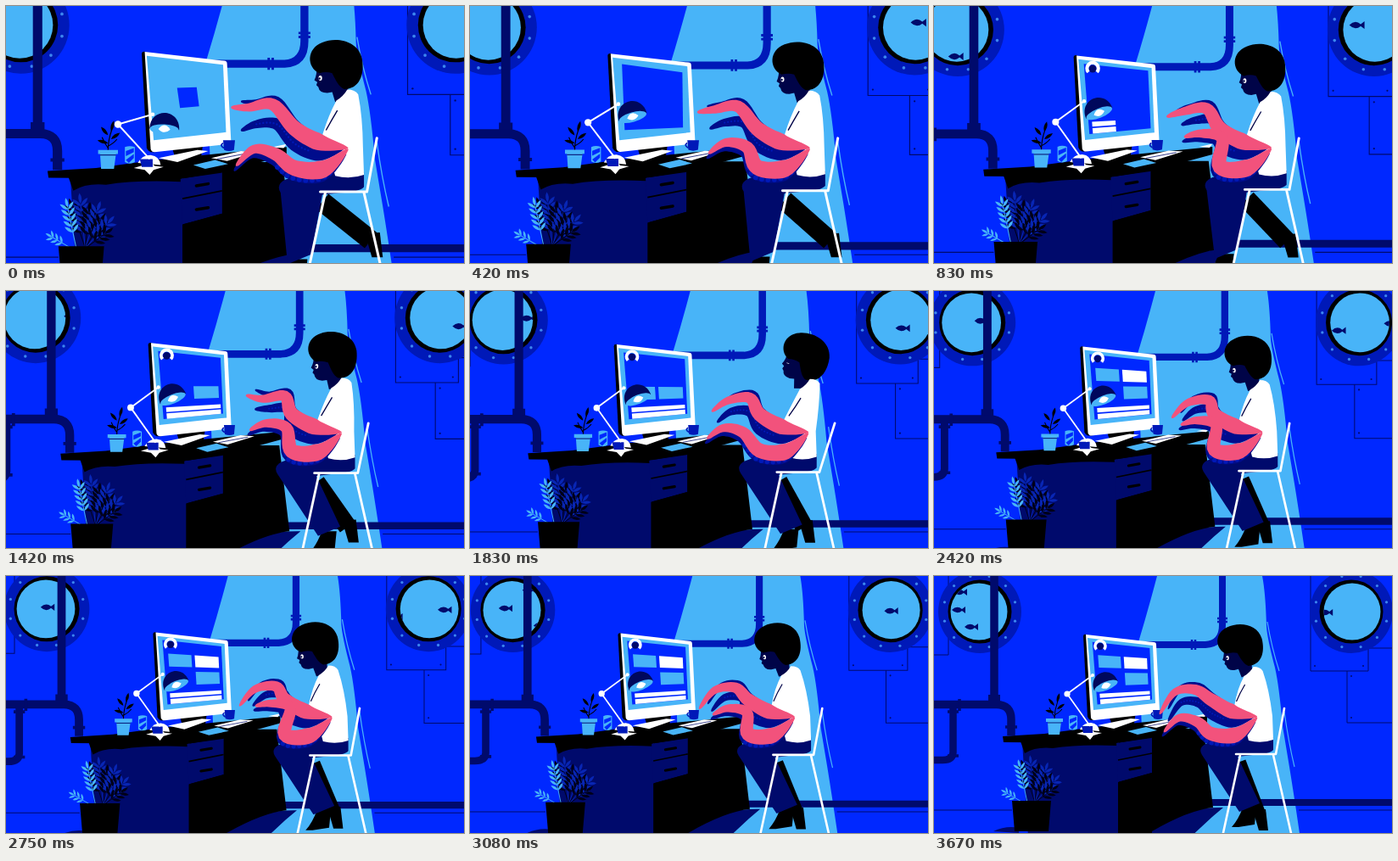
Recreate the animation shown at these times as an HTML page. Size 540x303 px, loop 3.75 s.

```html
<!DOCTYPE html>
<html lang="en">
<head>
<meta charset="utf-8">
<title>Desk under the sea</title>
<style>
html, body { margin: 0; width: 100%; height: 100%; overflow: hidden; background: #0028ff; }
svg { display: block; width: 100vw; height: 100vh; }
</style>
</head>
<body>
<svg id="stage" viewBox="0 0 540 303" preserveAspectRatio="xMidYMid slice"></svg>
<script>
const BLUE = '#0028ff', LIGHT = '#48b4f8', NAVY = '#000a6c', DEEP = '#000c8c', RING = '#0019b8',
      BLACK = '#000', PINK = '#f2527c', SKIN = '#000448', WHITE = '#fff';
const LOOP = 3750, STEP = 250 / 3, LAST = 44;
const stage = document.getElementById('stage');

const path = (d, fill, more = '') => `<path d="${d}" fill="${fill}" ${more}/>`;
const line = (d, color, w, more = '') =>
  `<path d="${d}" fill="none" stroke="${color}" stroke-width="${w}" ${more}/>`;
const disc = (x, y, r, fill) => `<circle cx="${x}" cy="${y}" r="${r}" fill="${fill}"/>`;
const ROUND = 'stroke-linecap="round" stroke-linejoin="round"';

const lerp = (a, b, f) => a + (b - a) * f;
const ramp = (i, a, b) => {
  const f = Math.min(1, Math.max(0, (i - a) / (b - a)));
  return f * f * (3 - 2 * f);
};
const bump = (i, mid, width) => Math.exp(-(((i - mid) / width) ** 2));
const wave = (i, period) => Math.cos(2 * Math.PI * i / period);

// ---- still parts ----

function leaf(x, y, deg, len, fill) {
  const w = len * .3;
  return path(`M0 0Q${len / 2} ${-w} ${len} 0Q${len / 2} ${w} 0 0`, fill,
    `transform="translate(${x} ${y}) rotate(${deg})"`);
}

function sprig(x0, y0, deg, len, size, fill) {
  const a = deg * Math.PI / 180, n = Math.round(len / 8);
  const at = f => [x0 + Math.cos(a) * len * f, y0 + Math.sin(a) * len * f];
  let s = line(`M${x0} ${y0}L${at(1)}`, fill, .9) + leaf(...at(1), deg, size, fill);
  for (let k = 1; k <= n; k++)
    for (const side of [-45, 45]) s += leaf(...at(.25 + .7 * k / n), deg + side, size, fill);
  return s;
}

function darkFan() {
  let s = '';
  for (let k = 0; k < 7; k++)
    s += sprig(119, 267, -108 + 12 * k, 42 - 3 * k + 6 * (k % 2), 11, k % 2 ? '#0826b4' : '#000018');
  return s;
}

function porthole(x, y, shift, id) {
  let s = disc(x, y, 49, RING);
  for (let k = 0; k < 12; k++) {
    const a = (k + .5) * Math.PI / 6;
    s += disc(x + 43 * Math.cos(a), y + 43 * Math.sin(a), 1.6, '#3c86f0');
  }
  const glass = fill => disc(x + shift, y, 33.5, fill);
  return s + disc(x, y, 37.5, BLACK) + glass(LIGHT) +
    `<clipPath id="clip-${id}">${glass(WHITE)}</clipPath><g id="${id}" clip-path="url(#clip-${id})"></g>`;
}

const room =
  path('M263 0Q252 42 241 78L250 310H432Q425 262 419 225L411 177Q407 130 402 108Q393 74 392 60Q391 20 387 0Z', LIGHT) +
  line('M393 54Q398 84 407 112M413 160Q418 196 425 225', LIGHT, 1.2) +
  line('M340 0V58Q340 80 320 81H244', RING, 8) +
  line('M334 50H346M334 54H346M304 75V87M308 75V87', RING, 2.5) +
  line('M0 276H92M430 276H540M17 0V93H-30M444 0V112H512V85H600M487 112V173H600', NAVY, 1) +
  [[449, 106], [506, 106], [492, 118], [492, 167]].map(p => disc(...p, 1, NAVY)).join('') +
  porthole(54, 42, -1, 'seaL') + porthole(492, 42, 1, 'seaR') +
  line('M71 -30V146', NAVY, 9.5) + line('M64 142H78M64 146H78', NAVY, 4) +
  line('M-40 151.5H74Q91 152 91 169V188', NAVY, 9.5) +
  line('M22.5 153V208Q22 217 10 217H-40', NAVY, 8.5) +
  line('M30 145V159M16 160H29M16 212H29M84 178H98', NAVY, 3.5) +
  line('M322 267H600', NAVY, 8) +
  path('M216 310L240 294Q300 272 341 273L328 284L300 310Z', NAVY) +
  path('M70 301Q85 294 100 297V303Z', NAVY);

const desk =
  path('M250 180H318L329 273Q300 276 257 301V340H212V196Z', BLACK) +
  path('M104 195H218V340H113Z', NAVY) +
  path('M102 195H216V200Q170 198 140 203Q120 201 107 209Z', BLACK) +
  path('M215 197L257 190V232L217 243Z', NAVY) + path('M217 243L257 232V340H217Z', BLACK) +
  line('M217 217L257 209', BLACK, 1.6) + line('M231 204L243 202M231 228L243 226', BLACK, 3, ROUND) +
  path('M81 189L130 186L190 178L260 171L322 165V173L256 191L214 197L82 196Z', BLACK);

const monitor =
  path('M205 160H238L236 174L210 177Z', BLACK) +
  path('M193 176L232 168L243 169L212 180Z', WHITE) +
  path('M176 71Q176 68 180 69L190 170H185Q182 169 181 166Z', BLACK) +
  path('M179 69L259 78Q262 78 262 81L266 159Q266 162 263 162L189 170Q186 170 185 167Z', WHITE) +
  path('M181 73L258 82L261 150L188 158Z', LIGHT) + '<g id="screen"></g>';

const clutter =
  path('M228 183L250 178L263 182L240 187Z', LIGHT) +
  path('M246 176L276 169L291 170L262 179Z', WHITE) + line('M252 177L284 171', NAVY, .7) +
  path('M308 165L322 162L319 166Z', WHITE) +
  path('M258 158H270L269 168Q264 170 259 168Z', RING) + line('M258 161Q254 163 259 166', RING, 1.5) +
  line('M142 169Q142 158 146 147M142 166Q138 160 136 155M142 164Q148 161 151 157', BLACK, 1) +
  [-75, -130, -35, -165].map((deg, k) => leaf(145 - 3 * (k % 2), 149 + 4 * k, deg, 11, BLACK)).join('') +
  path('M132 168H152V172H150L148 187H135L134 172H132Z', LIGHT) + line('M134 173H150', NAVY, .9) +
  path('M159 165Q164 163 169 165V180Q164 183 159 180Z', LIGHT) +
  path('M160 169L168 166V170L160 174ZM160 178L168 172V176L163 181Z', BLUE) +
  path('M168 186L178 183L183 178L189 184L198 185L188 188L184 193L179 188Z', WHITE) +
  path('M172 181Q176 173 185 173Q194 174 195 183Z', WHITE) + path('M174 177H187V185H176Z', RING);

const plant = darkFan() + sprig(110, 267, -102, 42, 10, LIGHT) + sprig(105, 267, -150, 22, 8, LIGHT) +
  path('M92 265H138L135 301H95Z', BLACK);

const head =
  path('M-20 2Q-19 10-22 16L-19 18L-20 21L-18 23Q-17 29-9 29L-4 28L-1 38L12 34L12 8Z', SKIN) +
  path('M-17 9C-30 3-30-16-14-22C0-28 22-24 26-6C29 11 23 25 8 25C3 23 0 17-4 9Q-10 7-17 9Z', BLACK) +
  '<g id="eye"><ellipse cx="-16" cy="14" rx="1.8" ry="2.6" fill="#fff"/>' + disc(-16.8, 14.4, 1.1, SKIN) + '</g>';

stage.innerHTML = `<rect width="540" height="303" fill="${BLUE}"/><g id="cam">` + room + desk + monitor + clutter +
  '<g id="lamp"></g>' + plant + '<g id="legs"></g><g id="head">' + head +
  '</g><g id="shirt"></g><g id="chair"></g><g id="arms"></g></g>';
const el = {};
stage.querySelectorAll('g[id]').forEach(g => el[g.id] = g);

// ---- tentacles ----

const trace = pts => 'M' + pts.map(p => p.map(v => v.toFixed(1)).join(' ')).join('L');
const move = (pts, dx, dy) => pts.map(([x, y]) => [x + dx, y + dy]);

// Smooth curve through the points, eight samples per span
function curve(p) {
  const out = [], N = 8, at = k => p[Math.max(0, Math.min(p.length - 1, k))];
  for (let s = 0; s <= (p.length - 1) * N; s++) {
    const k = Math.min(p.length - 2, Math.floor(s / N)), t = s / N - k;
    const [a, b, c, d] = [at(k - 1), at(k), at(k + 1), at(k + 2)];
    out.push([0, 1].map(m => .5 * (2 * b[m] + (c[m] - a[m]) * t +
      (2 * a[m] - 5 * b[m] + 4 * c[m] - d[m]) * t * t + (3 * b[m] - a[m] - 3 * c[m] + d[m]) * t ** 3)));
  }
  return out;
}

// Thin at the tip, wide near the elbow, pointed at the shoulder
function tentacle(pts, size, fill) {
  const c = curve(pts), n = c.length - 1, left = [], right = [];
  c.forEach(([x, y], k) => {
    const a = c[Math.max(0, k - 1)], b = c[Math.min(n, k + 1)], t = k / n;
    const len = Math.hypot(b[0] - a[0], b[1] - a[1]) || 1;
    const w = (.6 + size * t ** .6) * Math.min(1, .05 + (1 - t) * 4.5);
    const nx = -(b[1] - a[1]) / len * w, ny = (b[0] - a[0]) / len * w;
    left.push([x + nx, y + ny]);
    right.unshift([x - nx, y - ny]);
  });
  return path(trace(left.concat(right)) + 'Z', fill);
}

function drawArms(i, lean, rest) {
  const u = i / LAST, root = 384 + 7 * lean - 3 * rest;
  const ux = 266 + 18 * Math.sin(Math.PI * u) ** 2, uy = 125 + 38 * u - 14 * bump(i, 17, 3), crest = 122 + 12 * u;
  const beat = .7 * wave(i, 22) + .3 * wave(i, 44);
  const lx = 284 - 13 * beat, ly = 166 + 18 * beat, ridge = .55 * ly + 66;
  const a = [[ux, uy], [ux + 18, crest + 3], [ux + 42, crest], [root - 54, 146], [root - 29, 160], [root, 166]];
  const b = [[lx, ly], [lx + 18, ridge], [lx + 40, ridge + 5], [root - 54, 186], [root - 25, 187], [root, 167]];
  const mid = a.map((p, k) => [lerp(p[0], b[k][0], .4) + 8 - 2.4 * k, lerp(p[1], b[k][1], .4)]);
  const behind = a.map(([x, y], k) => [x + 10 - 3 * k, y - 6 + k]);
  const dots = (pts, from, to, w) =>
    line(trace(curve(pts).slice(from, to)), RING, w, ROUND + ` stroke-dasharray="0 ${w + 1.5}"`);
  el.arms.innerHTML = tentacle(behind, 6, DEEP) + tentacle(mid, 9, DEEP) + dots(mid, 8, 30, 2) +
    tentacle(move(b, -2, 5), 9, DEEP) + dots(move(b, -3, 10), 18, 36, 5) +
    tentacle(a, 9.5, PINK) + tentacle(b, 10, PINK);
}

// ---- screen ----

const corner = [[181, 73], [258, 82], [188, 158], [261, 150]];
const onScreen = (u, v) => [0, 1].map(m =>
  lerp(lerp(corner[0][m], corner[1][m], u), lerp(corner[2][m], corner[3][m], u), v));
const pane = (u0, v0, u1, v1, fill) =>
  path(trace([onScreen(u0, v0), onScreen(u1, v0), onScreen(u1, v1), onScreen(u0, v1)]) + 'Z', fill);

function drawScreen(i) {
  const g = ramp(i, 1, 6), half = lerp(.13, .44, g), face = ramp(i, 5, 8);
  const bar = lerp(.12, .92, ramp(i, 6, 15)), rise = ramp(i, 23, 28), y = lerp(.5, .23, rise);
  const c1 = ramp(i, 16, 21), c2 = ramp(i, 13, 17), c3 = ramp(i, 24, 29);
  let s = `<g transform="rotate(${(i * 5 - 4) * (1 - g)} 220 113)">` +
    pane(.51 - half, .49 - half, .51 + half, .49 + half, BLUE) + '</g>';
  if (face) s += `<g transform="translate(196 82) scale(${face})">` + disc(0, 1, 4, NAVY) +
    line('M-4.5 4.5A6 6 0 1 1 4.5 4.5', WHITE, 3.6) + '</g>';
  if (bar > .13) s += pane(.12, .78, bar, .84, WHITE) + pane(.12, .86, bar, .93, WHITE);
  if (c1) s += pane(.14, y, .14 + .35 * c1, y + .18, LIGHT);
  if (c2) s += pane(.54, y, .54 + .36 * c2, y + .18, rise > .4 ? WHITE : LIGHT);
  if (c3) s += pane(.54, .67 - .19 * c3, .9, .67, LIGHT);
  el.screen.innerHTML = s;
}

// ---- other moving parts ----

function drawLamp(i) {
  const f = ramp(i, 1, 7), joint = [lerp(152, 157, f), lerp(142, 139, f)], end = [187, lerp(132, 117, f)];
  el.lamp.innerHTML = line(trace([[184, 177], joint, end]), WHITE, 1.7) + disc(...joint, 3.6, WHITE) +
    `<g transform="translate(${lerp(199, 201, f)} ${lerp(142, 125, f)}) rotate(${lerp(3, -22, f)})">` +
    path('M-15 5C-15-17 15-17 15 5Z', '#00085c') +
    `<ellipse cy="5" rx="14.5" ry="5" fill="${LIGHT}"/>` + path('M-6 5Q0-3 6 5Q0 11-6 5', WHITE) + '</g>' +
    disc(...end, 2, WHITE);
}

function drawPerson(i, lean, rest) {
  const hx = 372 - 11 * rest + 16 * lean, d = (hx - 360) * .6;
  const step = ramp(i, 9, 17), fx = lerp(334, 371, step), fy = lerp(292, 287, step);
  const bx = lerp(411, 386, ramp(i, 0, 30)), by = lerp(268, 292, i / LAST);
  el.legs.innerHTML =
    line(`M358 220L${bx - 4} ${by - 9}`, BLACK, 20) +
    path(`M${bx - 10} ${by - 16}L${bx + 5} ${by - 17}L${bx + 8} ${by + 8}H${bx - 3}Z`, BLACK) +
    path(`M${fx - 7} ${fy - 14}H${fx + 9}L${fx + 7} ${fy + 6}L${fx - 12} ${fy + 9}H${fx - 20}Q${fx - 12} ${fy} ${fx - 7} ${fy - 14}`, BLACK) +
    path(`M400 190V205Q396 210 376 211L358 213L${fx + 13} ${fy - 19}L${fx - 11} ${fy - 9}L316 211Q311 203 320 198L352 186Z`, NAVY);
  const tilt = 18 * lean - 4 * rest, shut = ramp(lean, .5, .9);
  el.head.setAttribute('transform', `translate(${hx} 81.5) rotate(${tilt})`);
  el.eye.setAttribute('transform', `translate(0 ${12 * shut}) scale(1 ${1 - .88 * shut})`);
  el.shirt.innerHTML =
    path(`M${365 + d} 118Q${372 + d} 114 ${376 + d} 107Q${384 + d} 107 ${387 + d} 112Q${395 + d * .5} 134 399 165L400 193Q386 198 371 194L363 164L${354 + d * .6} 152Q${357 + d} 133 ${365 + d} 118Z`, WHITE) +
    line(`M${366 + d} 128Q${360 + d} 138 ${356 + d * .8} 148`, SKIN, 1.2);
  el.chair.innerHTML = line(`M356 210H403L${413 + 7 * lean} 156M361 211L339 312M400 211L423 312`, WHITE, 2.6, ROUND);
}

// Each swimmer heads left: step, place at that step, speed
const shoalL = [[10, 52, 70, 5], [44, 29, 40, 2.36], [44, 44, 60, 6], [44, 31, 19, 6]];
const shoalR = [[10, 474, 37, 4.4], [22, 495, 51, 3.7], [37, 493, 43, 4.4]];
const swim = (shoal, i) => shoal.map(([k, x, y, v]) =>
  path('M-8 0Q-2-6 4-1L8-4V4L4 1Q-2 6-8 0', NAVY, `transform="translate(${x - v * (i - k)} ${y})"`)).join('');

function draw(ms) {
  const i = Math.min(LAST, Math.floor((ms % LOOP + 4) / STEP)), u = i / LAST;
  const zoom = (1 - .145 * (u + Math.sin(u * Math.PI / 2)) / 2) / .855;
  const lean = bump(i, 22, 4), rest = ramp(i, 20, 36);
  el.cam.setAttribute('transform', `translate(270 157) scale(${zoom}) translate(-270 -157)`);
  drawScreen(i);
  drawLamp(i);
  drawPerson(i, lean, rest);
  drawArms(i, lean, rest);
  el.seaL.innerHTML = swim(shoalL, i);
  el.seaR.innerHTML = swim(shoalR, i);
}

function tick() {
  draw(performance.now());
  requestAnimationFrame(tick);
}
tick();
</script>
</body>
</html>
```
